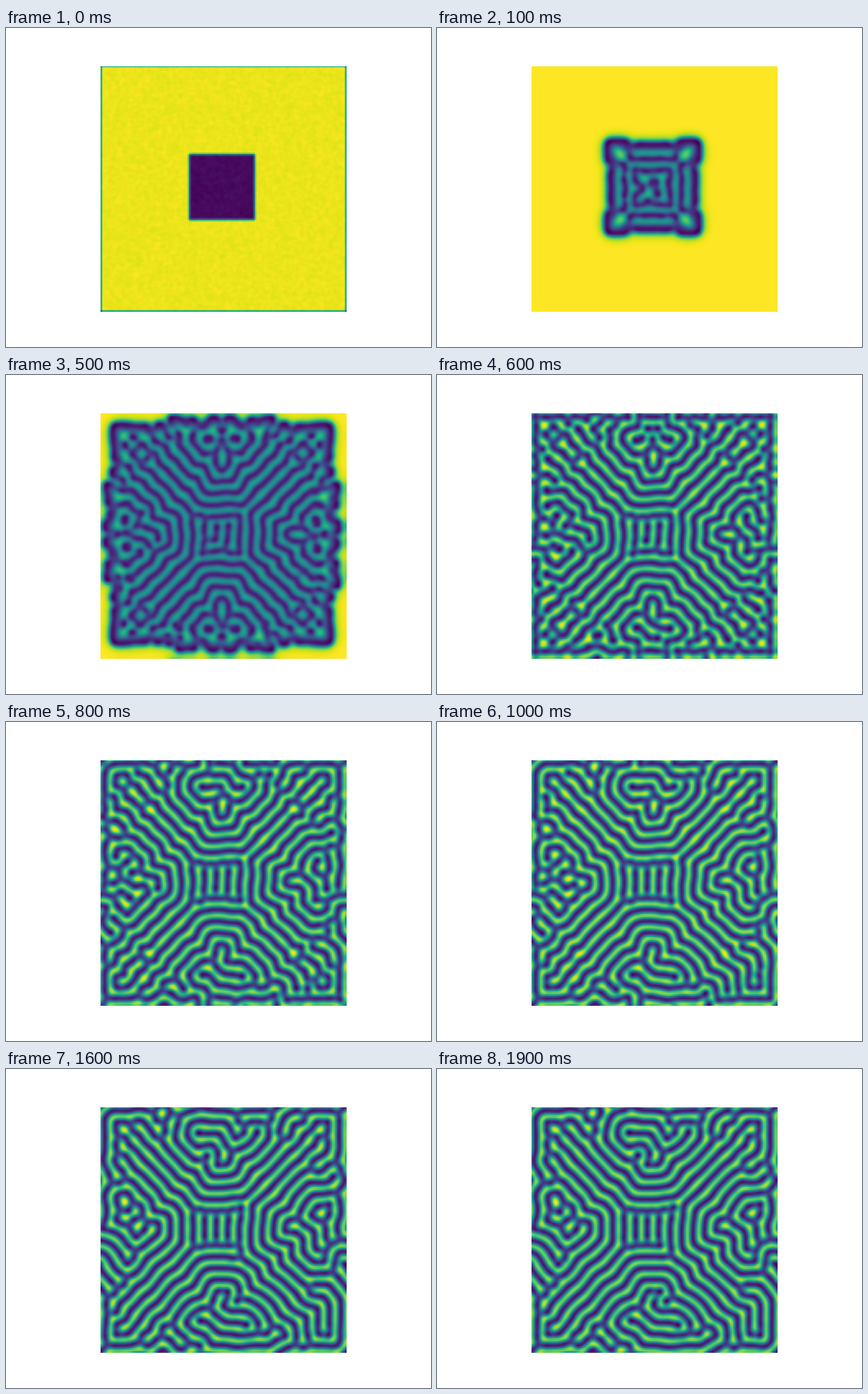
Animation of 544 by 408 pixels, one loop 2 s. Source, as a matplotlib script:

```python
import numpy as np
import matplotlib.pyplot as plt
from matplotlib.animation import FuncAnimation

# Gray-Scott reaction-diffusion on a periodic grid
N, R = 150, 20
DU, DV, F, K = 0.19, 0.05, 0.060, 0.062
NOISE = 0.02
FRAMES, INTERVAL = 20, 100
CHUNK = 50          # steps between stored states
SPREAD = 104        # width in cells the pattern covers after 3 frames
MAX_PER_FRAME = 25  # upper limit of chunks per frame
W, H, DPI = 544, 408, 85

rng = np.random.default_rng(7)
Z = np.zeros((2, N + 2, N + 2))
cells = Z[:, 1:-1, 1:-1]
u, v = cells
D = np.array([DU, DV])[:, None, None]

u[...] = 1.0
seed = slice(N // 2 - R, N // 2 + R)
Z[0, seed, seed] = 0.50
Z[1, seed, seed] = 0.25
u += NOISE * rng.uniform(-1, 1, u.shape)


def wrap():
    Z[:, 0], Z[:, -1] = Z[:, -2], Z[:, 1]
    Z[:, :, 0], Z[:, :, -1] = Z[:, :, -2], Z[:, :, 1]


def step():
    change = Z[:, :-2, 1:-1] + Z[:, 2:, 1:-1]
    change += Z[:, 1:-1, :-2]
    change += Z[:, 1:-1, 2:]
    change -= 4 * cells
    change *= D
    uvv = u * v * v
    change[0] += F * (1 - u) - uvv
    change[1] += uvv - (F + K) * v
    cells[...] += change
    wrap()


def width():
    return np.count_nonzero((v > 0.15).any(axis=0))


def simulate():
    step()
    states = [u.astype(np.float32)]

    def advance():
        for _ in range(CHUNK):
            step()
        states.append(u.astype(np.float32))

    while width() < SPREAD and len(states) <= 3 * MAX_PER_FRAME:
        advance()
    per_frame = max(1, round((len(states) - 1) / 3))
    while len(states) <= per_frame * (FRAMES - 1):
        advance()
    return states[::per_frame][:FRAMES]


shots = simulate()

fig = plt.figure(figsize=(W / DPI, H / DPI), dpi=DPI)
ax = fig.add_axes([121.2 / W, 0.11, 0.77 * H / W, 0.77])
ax.axis("off")
im = ax.imshow(shots[0], cmap="viridis")


def draw(i):
    shot = shots[i]
    im.set_data(shot)
    im.set_clim(shot.min(), shot.max())
    return [im]


anim = FuncAnimation(fig, draw, frames=FRAMES, interval=INTERVAL, repeat=True)
plt.show()
```
